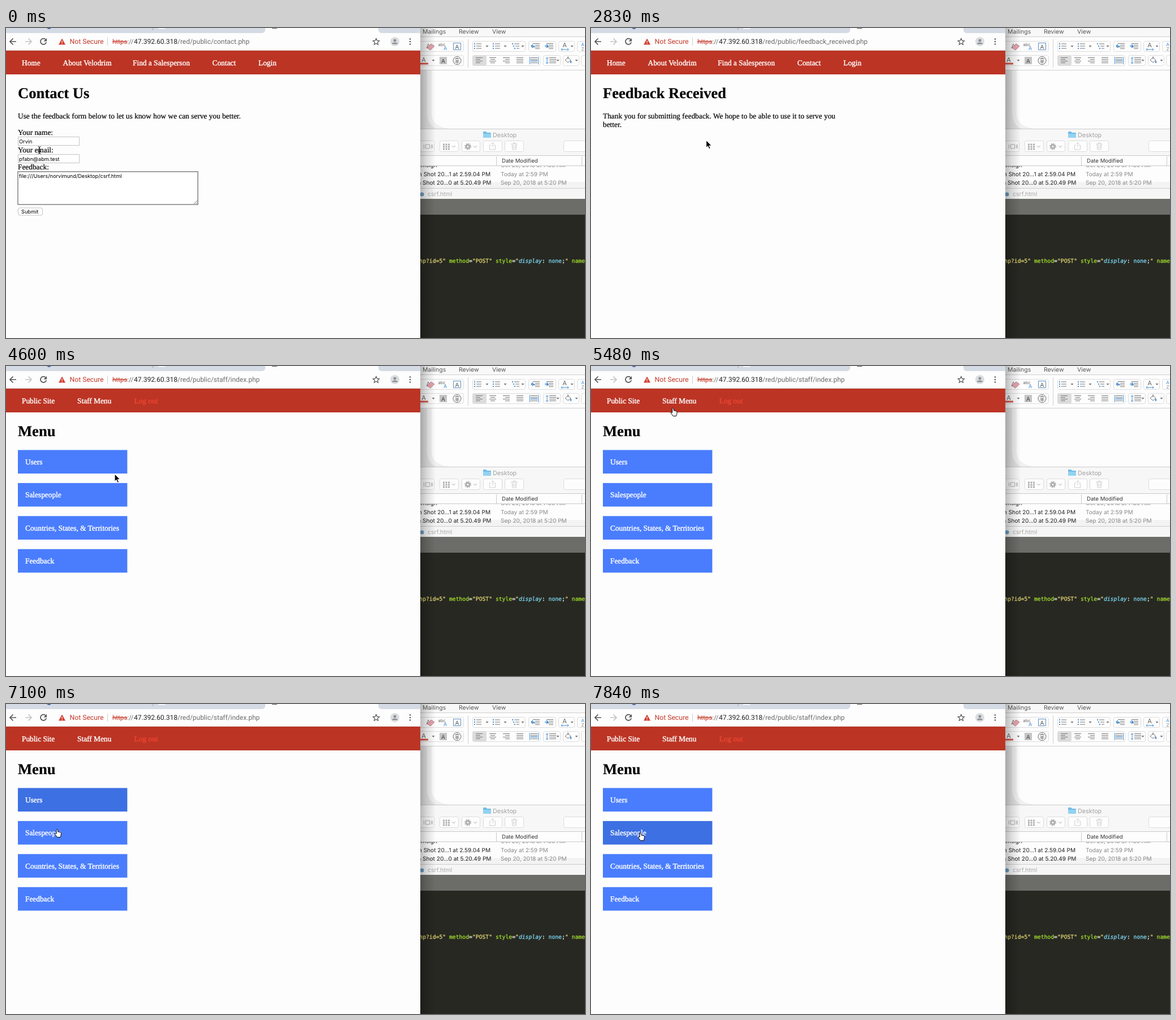
An HTML page that plays this animation: 1023 px wide and 548 px high, repeating every 8 s.

```html
<!DOCTYPE html>
<html lang="en">
<head>
<meta charset="utf-8">
<title>Feedback form demo</title>
<style>
  html, body { margin: 0; width: 100%; height: 100%; overflow: hidden; background: #fdfdfd; }
  svg { display: block; }
  text { white-space: pre; text-rendering: geometricPrecision; }
  .page { font: 13.35px "Liberation Serif", serif; }
  .page text { fill: currentColor; stroke: currentColor; stroke-width: .2; }
  .page .nav { color: #fff; }
  .page .nav text { stroke-width: .4; }
  .page .field text { stroke: none; }
  .h1 { font-size: 26.6px; font-weight: bold; }
  .field, .mac { font-family: Inter, sans-serif; }
  .field { font-size: 9.2px; }
  .mac { font-size: 10.5px; }
  .bar { font: 12px Roboto, sans-serif; }
  .code { font: 9.73px "DejaVu Sans Mono", monospace; color: #f8f8f2; fill: currentColor; stroke: currentColor; stroke-width: .25; }
  .code tspan { fill: currentColor; stroke: currentColor; }
  .line { fill: none; }
  .str { color: #e6db74; } .attr { color: #a6e22e; } .css { color: #7fdcf7; }
</style>
</head>
<body>
<svg width="1023" height="548" viewBox="0 0 1023 548">
  <defs>
    <linearGradient id="shade">
      <stop offset="0" stop-opacity=".26"/>
      <stop offset=".4" stop-opacity=".13"/>
      <stop offset="1" stop-opacity="0"/>
    </linearGradient>
    <clipPath id="rightSide"><path d="M732 0h291v548h-291z"/></clipPath>
    <clipPath id="rows"><path d="M732 244h291v40h-291z"/></clipPath>
  </defs>

  <g clip-path="url(#rightSide)">
    <!-- word processor -->
    <path fill="#f8f8f8" d="M732 0h291v75h-291z"/>
    <path fill="#fdfdfd" d="M732 16h291v58h-291zM732 75h291v104h-291z"/>
    <path class="line" stroke="#d0d0d0" d="M732 15.500h291M732 74.500h291M816.500 20v50"/>
    <g class="mac" fill="#555">
      <text x="736" y="10">Mailings</text>
      <text x="800" y="10">Review</text>
      <text x="859" y="10">View</text>
    </g>
    <g id="ribbon"></g>
    <path fill="#000" opacity=".05" d="M732 75h20v75q0 24 31 28h240v1h-291z"/>
    <path fill="#000" opacity=".06" d="M732 75h12v75q0 24 22 29h-34z"/>

    <!-- file browser -->
    <path fill="#f7f7f7" d="M732 179h291v47h-291z"/>
    <path fill="#fdfdfd" d="M732 226h291v57h-291z"/>
    <path fill="#f3f3f3" d="M732 272h291v11h-291z"/>
    <path class="line" stroke="#c9c9c9" d="M732 178.500h291M732 225.500h291M732 243.500h291M866.500 227v16M1017.500 227v16"/>
    <path fill="#72bde6" d="M843 184q0-1 1-1h4l2 2h6q1 0 1 1v8h-14z"/>
    <path fill="#93d2f1" d="M843 187h14v7h-14z"/>
    <g id="browserButtons"></g>
    <g class="line" stroke="#b0b0b0">
      <path d="M738.500 206v7M741.500 206h7v7h-7zM751.500 206v7M753.500 206v7"/>
      <path stroke-width="3" stroke-dasharray="3 1.500" d="M772 206h12.500M772 210h12.500M772 214h12.500"/>
      <path d="M788 208l3 3 3-3M826 208l3 3 3-3"/>
      <circle cx="816" cy="209.500" r="3" stroke-width="3"/>
      <circle cx="816" cy="209.500" r="5" stroke-width="2" stroke-dasharray="2 1.930"/>
      <g stroke="#cfcfcf">
        <path d="M857 207h-2.500v8h10v-8h-2.500M860 211v-8M857.500 205l2.500-2.500 2.500 2.500"/>
        <path d="M892.500 205h11M894 205l1 10h6l1-10M896.500 205v-2h3v2M896.500 207v6M899.500 207v6"/>
      </g>
    </g>
    <g class="mac">
      <text x="860" y="193" font-size="10.8" fill="#a0a0a0">Desktop</text>
      <text x="876" y="238" font-size="9.6" fill="#333">Date Modified</text>
      <g clip-path="url(#rows)" fill="#222" font-size="10.1">
        <text x="762" y="246" text-anchor="end">damsign</text>
        <text x="874" y="246" fill="#888">Oct 20, 2018 at 7:30 AM</text>
        <text x="856" y="261.500" text-anchor="end">Screen Shot 20...1 at 2.59.04 PM</text>
        <text x="874" y="261.500" fill="#888">Today at 2:59 PM</text>
        <text x="857.500" y="277" text-anchor="end">Screen Shot 20...0 at 5.20.49 PM</text>
        <text x="874" y="277" fill="#888">Sep 20, 2018 at 5:20 PM</text>
      </g>
    </g>

    <!-- code editor -->
    <path fill="#f6f6f6" d="M732 283h291v19h-291z"/>
    <path class="line" stroke="#ccc" d="M732 283.500h291"/>
    <circle cx="735" cy="294" r="3.500" fill="#6f9fc4"/>
    <text class="mac" x="745" y="297" fill="#aaa">csrf.html</text>
    <path fill="#6c6c68" d="M732 302h291v28h-291z"/>
    <path fill="#272822" d="M732 330h291v218h-291z"/>
    <text class="code" x="730.300" y="415"><tspan class="str">hp?id=5"</tspan> <tspan class="attr">method</tspan>=<tspan class="str">"POST"</tspan> <tspan class="attr">style</tspan>=<tspan class="str">"</tspan><tspan class="css" font-style="italic">display</tspan>: <tspan class="css">none</tspan>;<tspan class="str">"</tspan> <tspan class="attr">name</tspan>=</text>
    <path fill="url(#shade)" d="M732 0h27v548h-27z"/>
  </g>

  <!-- browser -->
  <path fill="#fdfdfd" d="M0 0h732v548H0z"/>
  <path fill="#d5dbe5" d="M0 0h458v3q0 6-7 6H0zM658 0h74v9h-67q-7 0-7-6z"/>
  <path class="line" stroke="#a9afb9" d="M259.500 0v4"/>
  <path fill="#fff" d="M269 0h12v1.500h-12z"/>
  <circle cx="76" cy="-2" r="4" fill="#4768a8"/>
  <path id="tabMark" fill="#555" d="M470 0h9v1h-9z"/>
  <g class="line" stroke="#555" stroke-width="1.700">
    <path d="M18 24H7.500M12.500 18.500L7 24l5.500 5.500"/>
    <path stroke="#c4c4c4" d="M34 24h10.500M39.500 18.500L45 24l-5.500 5.500"/>
    <path d="M70 20.300a5.200 5.200 0 1 0 1.200 4.800"/>
    <path fill="#555" stroke="none" d="M72 18v5.500h-5.500z"/>
    <path stroke-width="1.200" d="M654 18.500l1.600 3.700 4 .4-3 2.700.9 4-3.500-2.100-3.500 2.100.9-4-3-2.700 4-.4z"/>
  </g>
  <path fill="#d23f31" d="M99 18.500l6 11H93z"/>
  <path fill="#fff" d="M98.400 22.500h1.200v3.500h-1.200zM98.400 27h1.200v1.200h-1.200z"/>
  <path class="line" stroke="#ccc" d="M179.500 17v14"/>
  <circle cx="687" cy="24" r="8" fill="#dcdde0"/>
  <path fill="#8d9197" d="M682 28.500q0-3 5-3t5 3zM684.500 22a2.500 2.500 0 1 1 5 0a2.500 2.500 0 1 1-5 0"/>
  <path stroke="#555" stroke-width="2.600" stroke-linecap="round" d="M714 19.500v0M714 24v0M714 28.500v0"/>
  <g class="bar" fill="#6a6a6a">
    <text x="112.500" y="28" fill="#c5392a" font-size="12.200">Not Secure</text>
    <text x="188" y="28" font-size="11.500"><tspan fill="#c5392a" text-decoration="line-through">https</tspan>://</text>
    <text x="226" y="28" fill="#222">47.392.60.318</text>
    <text id="path" x="303" y="28" font-size="11.950"></text>
  </g>
  <path fill="#ddd" d="M0 39h732v1H0z"/>
  <path fill="#bc3424" d="M0 40h732v42H0z"/>

  <g class="page">
    <g id="publicNav" class="nav">
      <text x="28" y="66">Home</text>
      <text x="100.500" y="66">About Velodrim</text>
      <text x="224" y="66">Find a Salesperson</text>
      <text x="364.500" y="66">Contact</text>
      <text x="446" y="66">Login</text>
    </g>

    <g id="contact">
      <text class="h1" x="21" y="123.500">Contact Us</text>
      <text x="21" y="160">Use the feedback form below to let us know how we can serve you better.</text>
      <text x="21" y="188.500">Your name:</text>
      <text x="21" y="219.500">Your email:</text>
      <text x="21" y="250">Feedback:</text>
      <g fill="#fff" stroke="#c3c3c3">
        <path d="M21.500 192.500h108v15h-108zM21.500 223.500h108v15h-108z"/>
        <path id="feedbackBox" d="M21 254h318v58H21z"/>
        <rect id="submit" x="21.500" y="318" width="43" height="13" rx="3"/>
      </g>
      <path class="line" stroke="#777" d="M332 311l6-6M335.500 311l2.500-2.500"/>
      <g class="field">
        <text x="23" y="203.500">Orvin</text>
        <text x="23" y="234.500">pfabn@abm.test</text>
        <text x="23" y="265">file:///Users/norvimund/Desktop/csrf.html</text>
        <text id="submitText" x="27" y="328">Submit</text>
      </g>
      <path id="caret" d="M204 256h1v11h-1z"/>
    </g>

    <g id="received">
      <text class="h1" x="21" y="123.500">Feedback Received</text>
      <text x="21" y="160">Thank you for submitting feedback. We hope to be able to use it to serve you</text>
      <text x="21" y="175">better.</text>
    </g>

    <g id="staff">
      <g class="nav">
        <text x="28" y="66">Public Site</text>
        <text x="126" y="66">Staff Menu</text>
        <text x="226.500" y="66" color="#ec4631">Log out</text>
      </g>
      <text class="h1" x="21" y="123.500">Menu</text>
      <g id="menu" class="nav"></g>
    </g>
  </g>

  <g id="cursor">
    <path id="arrow" stroke="#fff" d="M0 0v13l3-2.700 2.300 5 2.200-1-2.200-4.800h4.200z"/>
    <path id="hand" fill="#fff" stroke="#000" d="M3 1.500c0-1.500 2-1.500 2.200 0L6 5.200q1-.8 2 .2q1-.6 2 .6q1.600-.2 1.600 1.500L11 11.500l-1 3H4.500l-3-4L.4 8.200Q1.200 6.900 3 8.400z"/>
    <path id="beam" class="line" stroke="#111" d="M-2.500-6.500q2.500 0 2.500 2v9q0 2-2.500 2M2.500-6.500q-2.500 0-2.500 2v9q0 2 2.500 2M-2 2h4"/>
  </g>
</svg>
<script>
const $ = id => document.getElementById(id);
const show = (id, on) => $(id).setAttribute('visibility', on ? 'inherit' : 'hidden');
const path = (d, color, width = 1) => `<path d="${d}" fill="none" stroke="${color}" stroke-width="${width}"/>`;
const frame = (x, y, w, h, fill = '#fdfdfd') =>
  `<rect x="${x + .5}" y="${y + .5}" width="${w}" height="${h}" rx="3" fill="${fill}" stroke="#dcdcdc"/>`;
const letter = (x, y, s, size, color) =>
  `<text class="mac" x="${x}" y="${y}" text-anchor="middle" style="font-size:${size}px" fill="${color}">${s}</text>`;
const more = (x, y) => `<path fill="#777" d="M${x - 2.5} ${y - 1}h5l-2.500 3z"/>`;

// Four text lines; align 0 = left, .5 = centre, 1 = right.
const paragraph = (x, y, short, align) => [0, 1, 2, 3].map(i => {
  const w = i % 2 ? short : 12;
  return path(`M${x - 6 + (12 - w) * align} ${y - 4.5 + i * 3}h${w}`, '#777');
}).join('');
const list = (x, y, step = 0) => [0, 1, 2].map(i =>
  path(`M${x - 6 + i * step} ${y - 4 + i * 4}h2`, '#4c8fd0', 2) +
  path(`M${x - 2 + i * step} ${y - 4 + i * 4}h${9 - i * step}`, '#777')).join('');
const indent = (x, y, dir) => paragraph(x + 2, y, 8, 1) +
  path(`M${x - 7} ${y}h6M${x - 4 + dir * 3} ${y}l${-dir * 3}-3M${x - 4 + dir * 3} ${y}l${-dir * 3} 3`, '#3f8ed8', 1.5);

$('ribbon').innerHTML =
  [[726, 82], [824, 93], [923, 48], [976, 28], [1009, 30]].map(([x, w]) => frame(x, 23, w, 18)).join('') +
  [[726, 82], [824, 119], [949, 30], [984, 28], [1016, 30]].map(([x, w]) => frame(x, 48, w, 18)).join('') +
  frame(824, 48, 24, 18, '#dcdcdc') +
  letter(746, 36, 'A', 11, '#777') +
  '<path d="M744 35l7-7 6 4-7 7z" fill="#e9a6b0" stroke="#b98289"/>' +
  letter(770, 32, 'abc', 7.5, '#666') + letter(776, 39, 'A', 9, '#3f8ed8') +
  path('M790.500 26.500h13v12h-13z', '#5b8fc0') + letter(797, 36.5, 'A', 10, '#555') +
  list(833, 32) + more(850, 32) + list(866, 32) + more(882, 32) + list(900, 32, 2) + more(913, 32) +
  indent(935, 32, -1) + indent(959, 32, 1) +
  letter(987, 34, 'A', 11, '#666') + path('M981 38h13M983 36l-2 2 2 2M992 36l2 2-2 2', '#3f8ed8') + more(1000, 32) +
  letter(1019, 32, 'A', 8, '#3f8ed8') + letter(1019, 40, 'Z', 8, '#888') +
  letter(738, 60, 'A', 11, '#666') + path('M732 63h14', '#d8574a', 3) + more(755, 57) +
  '<path fill="#c4c4c4" d="M766 51h13v13h-13z"/>' + letter(772.5, 61.5, 'A', 10, '#444') +
  '<circle cx="797" cy="57.500" r="7" fill="none" stroke="#666"/>' + path('M793 54.500h8M797 52v2M794 57.500h6M793 60h8M797 57v6', '#666') +
  paragraph(836, 57, 8, 0) + paragraph(860, 57, 8, .5) + paragraph(884, 57, 8, 1) +
  paragraph(908, 57, 12, 0) + paragraph(933, 57, 12, 0) +
  path('M925.500 51v13M940.500 51v13M927 58h12', '#3f8ed8') +
  path('M956 52v11M954 54l2-2 2 2M954 61l2 2 2-2', '#3f8ed8') + paragraph(966, 57, 12, 0) + more(975, 57) +
  path('M988 57l5-5 5 5-5 4z M993 50v5', '#777') + path('M998 58v4', '#3f8ed8', 2) + more(1008, 57);

$('browserButtons').innerHTML =
  [[720, 36], [766, 33], [805, 32], [843, 33], [881, 33], [985, 60]].map(([x, w]) => frame(x, 199, w, 19)).join('');

$('menu').innerHTML = ['Users', 'Salespeople', 'Countries, States, &amp; Territories', 'Feedback']
  .map((label, i) => {
    const y = 148.5 + i * 58.4;
    return `<rect x="21" y="${y}" width="193.300" height="41.600"/><text x="34" y="${y + 25.2}">${label}</text>`;
  }).join('');
const menuItems = $('menu').querySelectorAll('rect');

// Pointer: start time, x, y, shape, hovered menu item.
const moves = [
  [0, 59, 216, 'beam'], [150, 60, 232, 'beam'], [300, 62, 272, 'beam'], [450, 57, 312, 'arrow'], [600, 54, 326, 'arrow'],
  [2830, 203.5, 198.5, 'arrow'], [2980, 353, 150, 'beam'],
  [3270, 392, 122, 'arrow'], [3410, 445, 78, 'arrow'], [3560, 461.5, 62, 'hand'],
  [4310, 385, 88, 'arrow'], [4460, 262, 145, 'arrow'], [4600, 192, 191, 'arrow'], [4750, 160, 230, 'hand', 1],
  [4900, 150, 222, 'hand', 1], [5050, 146, 180, 'hand', 0], [5190, 143, 130, 'arrow', 0], [5340, 141, 90, 'arrow'],
  [5480, 140.5, 74, 'hand'], [5630, 136, 71, 'hand'], [5780, 128, 74, 'hand'], [5920, 138, 72, 'hand'],
  [6070, 150, 76, 'hand'], [6220, 156, 92, 'arrow'], [6360, 148, 128, 'arrow'], [6510, 134, 136, 'arrow'],
  [6810, 118, 148, 'hand', 0], [6960, 98, 186, 'hand', 0], [7100, 86, 221, 'hand', 0], [7250, 84, 246, 'hand', 1],
  [7400, 83, 272, 'hand', 2], [7550, 83, 268, 'hand', 2], [7690, 83, 240, 'hand', 1], [7840, 83, 227, 'hand', 1]
];
const paths = { contact: 'contact.php', received: 'feedback_received.php', staff: 'staff/index.php' };
const within = (t, from, to) => t >= from && t < to;

function draw(t) {
  const page = t < 2380 ? 'contact' : t < 4010 ? 'received' : 'staff';
  for (const id in paths) show(id, id === page);
  show('publicNav', page !== 'staff');
  $('path').textContent = '/red/public/' + paths[page];

  const focused = t < 1940, pressed = within(t, 1940, 2080);
  show('caret', page === 'contact' && (within(t, 150, 600) || within(t, 1200, 1640)));
  $('feedbackBox').setAttribute('stroke', focused ? '#a0a0a0' : '#c3c3c3');
  $('feedbackBox').setAttribute('stroke-width', focused ? 2 : 1);
  $('submit').setAttribute('fill', pressed ? '#4a90f5' : '#fff');
  $('submitText').setAttribute('color', pressed ? '#fff' : '#000');
  $('tabMark').setAttribute('fill', within(t, 1940, 2380) ? '#aaa' : '#555');

  const [, x, y, shape, hovered] = moves.filter(m => m[0] <= t).pop();
  $('cursor').setAttribute('transform', `translate(${x} ${y})`);
  for (const id of ['arrow', 'hand', 'beam']) show(id, id === shape);
  menuItems.forEach((item, i) => item.setAttribute('fill', i === hovered ? '#3d70e2' : '#4a7dfd'));
}

const start = performance.now();
function tick() {
  draw((performance.now() - start) % 8000);
  requestAnimationFrame(tick);
}
tick();
</script>
</body>
</html>
```
